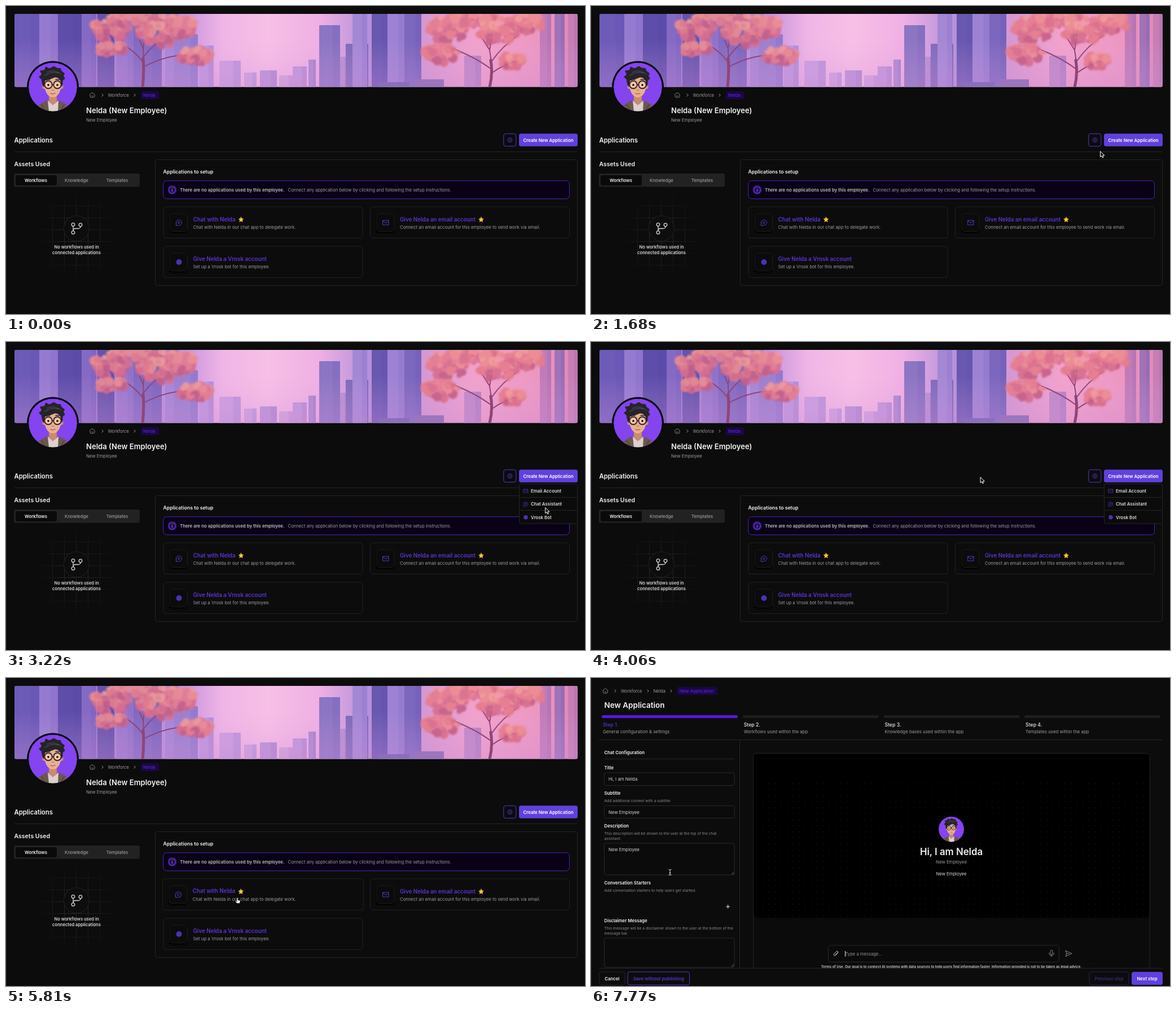
An HTML page for the animation above (8 s loop, 1026x546 px).

```html
<!DOCTYPE html>
<html lang="en">
<head>
<meta charset="utf-8">
<title>New application</title>
<style>
html, body { margin: 0; width: 100%; height: 100%; overflow: hidden; background: #0c0c0c; }
svg { display: block; font-family: Inter, "Noto Sans", sans-serif; cursor: none; }
</style>
</head>
<body>
<svg id="stage" width="1026" height="546" viewBox="0 0 1026 546"></svg>
<script>
const NAME = 'Nelda', BOT = 'Vrosk';
const GREY = '#9b9b9b', LINE = '#252525', VIOLET = '#5a35d0', FILL = '#6040dd';

let seed = 11;
const rand = () => (seed = seed * 16807 % 2147483647) / 2147483647;

const text = (x, y, s, size = 7.8, fill = GREY, weight = 400, anchor = 'start') =>
  `<text x="${x}" y="${y}" font-size="${size}" fill="${fill}" font-weight="${weight}" text-anchor="${anchor}">${s}</text>`;
const label = (x, y, s, size = 7.8) => text(x, y, s, size, '#f2f2f2', 600);
const centred = (x, y, s, size, fill, weight) => text(x, y, s, size, fill, weight, 'middle');
const rect = (x, y, w, h, r = 0, fill = 'none', stroke = 'none') =>
  `<rect x="${x}" y="${y}" width="${w}" height="${h}" rx="${r}" fill="${fill}" stroke="${stroke}"/>`;
const circle = (x, y, r, fill = 'none', stroke = 'none', w = 1) =>
  `<circle cx="${x}" cy="${y}" r="${r}" fill="${fill}" stroke="${stroke}" stroke-width="${w}"/>`;
const path = (d, stroke, w = 1, fill = 'none') =>
  `<path d="${d}" fill="${fill}" stroke="${stroke}" stroke-width="${w}" stroke-linecap="round" stroke-linejoin="round"/>`;
const line = (d, stroke = LINE) => `<path d="${d}" stroke="${stroke}"/>`;
const at = (x, y, s, scale = 1) => `<g transform="translate(${x} ${y}) scale(${scale})">${s}</g>`;

// Icons, each centred on its own origin
const home = path('M-4-1.5 0-4.5 4-1.5V2Q4 4 2 4H-2Q-4 4-4 2ZM-1.5 1.5Q0 2.7 1.5 1.5', GREY, .8);
const chevron = path('M-1-2.2 1.2 0-1 2.2', GREY, 1);
const chat = path('M-5 4.8V0A5 4.8 0 1 1 0 4.8ZM-2-1H2M-2 1.2H1', VIOLET, 1);
const mail = path('M-5-4H5V4H-5ZM-5-3 0 .8 5-3', VIOLET, 1);
const bot = circle(0, 0, 5, '#5030b4');
const star = path('M0-4.2 1.3-1.5 4.2-1.1 2.1 1 2.6 4 0 2.6-2.6 4-2.1 1-4.2-1.1-1.3-1.5Z', '#f4b92e', .8, '#f8c63a');
const gear = path('M-2-3.6H2L4 0 2 3.6H-2L-4 0Z', VIOLET, .9) + circle(0, 0, 1.4, 'none', VIOLET, .9);
const branch = [[-6, -7], [7, -6.5], [-6, 7]].map(([x, y]) => circle(x, y, 2.8, 'none', '#d6d6d6', 1.3)).join('') +
  path('M-6-4V4M7-3.5Q7 0 3 0H-2Q-6 0-6 4', '#d6d6d6', 1.3);

const avatar = `<g clip-path="url(#round)">${circle(0, 0, 43, '#8444f0')}
  ${path('M-31 45Q-29 30-10 24L0 32 10 24Q28 30 31 45Z', 'none', 0, '#6c584f')}
  ${path('M-9 24-7 44H9L10 24 0 32Z', 'none', 0, '#ddd0d0')}
  ${path('M-7 12H7V26L0 32-7 26Z', 'none', 0, '#c98b6c')}
  ${circle(-15, 0, 3.5, '#d99673')}${circle(15, 0, 3.5, '#d99673')}
  ${path('M-15-12Q-16 6-9 14 0 23 9 14 16 6 15-12Q0-26-15-12Z', 'none', 0, '#e8b08e')}
  ${path('M-16 1Q-20-7-20-13L-25-18-20-22-23-29-15-30-13-36-6-33 2-37 7-34 14-33 15-29 21-24 19-19 22-15 18-12 16 1 14-10Q11-17 4-17-6-13-14-11Z', 'none', 0, '#26232a')}
  ${path('M-14-20Q-4-28 9-25M-10-26Q2-32 14-23', '#4a464e', 1.3)}
  ${[-8, 8].map(x => circle(x, -3.5, 3.4, '#fff4ec') + circle(x, -3.5, 2.2, '#4d2b20') + circle(x, -4, 6.8, 'none', '#211a1e', 1.7)).join('')}
  ${path('M-1.3-4H1.3M-14.8-5-17-6M14.8-5 17-6M-12-13-5-13.5M5-13.5 12-13', '#211a1e', 1.5)}
  ${path('M-2 5Q0 7 2 5', '#c47c5e', 1.2)}${path('M-4 11.5Q0 13.5 4 11', '#a94f48', 1.3)}
  ${path('M-20 31-13 43M20 31 13 43', '#4c3c37', 1.2)}</g>`;

const BUILDINGS = [
  [15, 14, 44, '#6d5bb8'], [59, 14, 30, '#957bd0'], [92, 14, 42, '#5e4eaa'], [134, 14, 26, '#856ac4'],
  [162, 14, 30, '#6553ac'], [196, 14, 30, '#9878cd'], [226, 14, 50, '#8069c0'], [282, 14, 24, '#a585d4'],
  [304, 50, 36, '#9a80d0'], [342, 70, 26, '#bd97de'], [378, 97, 38, '#c99fe1'], [422, 118, 22, '#cda3e2'],
  [450, 114, 30, '#bb93d8'], [484, 123, 26, '#d3a3e0'], [508, 107, 25, '#c297db'], [536, 95, 13, '#ae89d0'],
  [555, 34, 37, '#8c75c3'], [592, 90, 12, '#b78fd4'], [602, 67, 40, '#8069ba'], [614, 14, 26, '#a488d6'],
  [648, 14, 28, '#6858b0'], [676, 14, 30, '#9d82d4'], [706, 14, 30, '#7b67bd'],
  [812, 88, 30, '#c088c8'], [946, 14, 20, '#c07cb8'], [972, 14, 18, '#a072b8'], [996, 14, 17, '#c67eb4']];

// Soft leaf masses, lit from above
function foliage(clusters) {
  const tones = ['#f09a98', '#ec8b92', '#e57d8e', '#d96e8c', '#c66188'];
  const leaves = clusters.map(([cx, cy, rx, ry]) => Array.from({ length: 60 }, () => {
    const a = rand() * 6.283, d = Math.sqrt(rand()), lift = Math.sin(a) * d;
    const tone = tones[Math.round(clamp(.5 + lift * .4 + (rand() - .5) * .6) * 4)];
    return circle((cx + Math.cos(a) * d * rx).toFixed(1), (cy + lift * ry).toFixed(1), (3 + rand() * 6).toFixed(1), tone);
  }).join('')).join('');
  return `<g filter="url(#soft)" opacity=".92">${leaves}</g>`;
}

const clamp = v => Math.max(0, Math.min(1, v));
const BARK = '#8f4578';

const banner = `<g clip-path="url(#banner)">${rect(15, 14, 998, 130, 0, 'url(#sky)')}
  ${BUILDINGS.map(([x, y, w, c]) => rect(x, y, w, 130, 1, c) + rect(x + w * .65, y, w * .35, 130, 0, '#4d3c9a18')).join('')}
  ${rect(15, 60, 998, 84, 0, 'url(#haze)')}
  ${rect(660, 135, 55, 9, 1, '#8b6fbd')}${rect(724, 130, 52, 14, 1, '#9b75bd')}
  ${path('M242 144Q245 110 243 75L230 45M243 100Q225 75 198 65M244 90Q262 66 286 52M243 75 249 35M246 107Q280 88 318 87', BARK, 2)}
  ${path('M242 144Q245 118 243 92', BARK, 5)}
  ${foliage([[188, 40, 34, 22], [240, 24, 58, 12], [275, 48, 42, 22], [334, 88, 30, 13], [186, 76, 26, 9], [312, 36, 26, 18]])}
  ${path('M858 144Q863 110 857 78L838 48M860 112Q828 88 782 72M859 100Q880 70 908 52M857 78 864 32M862 118Q878 106 902 98', BARK, 2)}
  ${path('M857 144Q863 120 859 96', BARK, 5)}
  ${foliage([[782, 40, 36, 24], [832, 24, 46, 12], [872, 44, 38, 26], [772, 84, 32, 16], [898, 98, 22, 11], [922, 30, 28, 16]])}</g>`;

const button = (x, y, w, h, s, fill, stroke, colour) =>
  rect(x, y, w, h, 3.5, fill, stroke) + centred(x + w / 2, y + h / 2 + 3, s, 7.8, colour, 600);
const crumb = (x, y, w, s) => rect(x, y, w, 14, 2, '#1b0648') + text(x + 4, y + 9.7, s, 7.9, '#602cd4');

const card = (x, y, icon, title, note, starX) => `<g>${rect(x, y, 353, 55.5, 5, '#0c0c0c', '#222')}
  ${rect(x + 10, y + 13, 33, 34, 5, '#040404')}${rect(x + 11.5, y + 12, 31, 31.5, 5, '#0b0b0b', '#1c1c1c')}${at(x + 27.5, y + 28, icon)}
  ${text(x + 52.5, y + 25.5, title, 9.8, VIOLET, 600)}${text(x + 52.5, y + 38.5, note)}
  ${starX ? at(starX, y + 22.5, star) : ''}</g>`;

const menu = rect(909.5, 251.5, 103, 70.5, 3, '#0b0b0b', LINE) + line('M910 275.5H1012M910 298.5H1012') +
  [[mail, 'Email Account'], [chat, 'Chat Assistant'], [bot, BOT + ' Bot']].map(([icon, s], i) =>
    at(921, 264 + i * 23.4, icon, .75) + text(930, 266.8 + i * 23.4, s, 7.8, '#dcdcdc', 600)).join('');

const employeePage = `${banner}
  ${circle(83, 143.5, 46, '#0b0b0b')}${at(83, 143.5, avatar)}
  ${at(153, 158, home)}${at(171, 158, chevron)}${text(180.5, 160.7, 'Workforce', 7.6)}${at(228, 158, chevron)}
  ${crumb(239, 151, 32, NAME)}
  ${label(142, 190, `${NAME} (New Employee)`, 13.1)}${text(142, 205, 'New Employee')}
  ${label(14.5, 241.5, 'Applications', 11.3)}
  ${rect(881.8, 226.4, 22, 22.2, 3.5, 'none', VIOLET)}${at(893, 237.5, gear)}
  ${button(909, 226.3, 104, 22.4, 'Create New Application', FILL, 'none', '#fff')}
  ${line('M14 258.5H1013')}
  ${label(14.5, 284, 'Assets Used', 10.5)}
  ${rect(14, 297, 223, 23.5, 3, '#222')}${rect(17, 300, 73, 18, 3, '#0a0a0a')}
  ${centred(53, 312, 'Workflows', 7.7, '#f2f2f2', 600)}${centred(125, 312, 'Knowledge', 7.8, GREY, 500)}${centred(197, 312, 'Templates', 7.8, GREY, 500)}
  <g mask="url(#fade)">${line('M82.5 333V480M103.5 333V480M124.5 333V480M145.5 333V480M166.5 333V480M62 354.5H188M62 375.5H188M62 396.5H188M62 417.5H188M62 438.5H188M62 459.5H188', '#272727')}</g>
  ${circle(125, 394.5, 22.5, '#0d0d0d', '#232323')}${at(125, 394.5, branch)}
  ${centred(125, 429.7, 'No workflows used in', 7.6, '#d4d4d4', 600)}${centred(125, 439.7, 'connected applications', 7.6, '#d4d4d4', 600)}
  ${rect(264.5, 272.5, 748, 223, 4, 'none', LINE)}
  ${label(278.5, 297, 'Applications to setup', 8.7)}
  ${rect(278.8, 309.8, 719.6, 32, 6, '#090115', '#4d25b8')}
  ${circle(294.5, 326, 8.5, '#251052')}${circle(294.5, 326, 6, 'none', '#6a3df0', 1.1)}${path('M294.5 325.3V328.8M294.5 323V323.1', '#7b50f5', 1.2)}
  ${text(308, 328.6, 'There are no applications used by this employee.', 7.85, '#bcbcbc', 600)}
  ${text(499.5, 328.6, 'Connect any application below by clicking and following the setup instructions.', 7.78)}
  <g id="chatCard">${card(279, 356, chat, `Chat with ${NAME}`, `Chat with ${NAME} in our chat app to delegate work.`, 416.5)}</g>
  ${card(645.5, 356, mail, `Give ${NAME} an email account`, 'Connect an email account for this employee to send work via email.', 842)}
  ${card(279, 426, bot, `Give ${NAME} a ${BOT} account`, `Set up a ${BOT} bot for this employee.`)}
  <g id="menu">${menu}</g>`;

const steps = ['General configuration &amp; settings', 'Workflows used within the app', 'Knowledge bases used within the app', 'Templates used within the app']
  .map((s, i) => {
    const x = 19 + i * 249.7;
    return rect(x, 66, 241, 5, 2.5, i ? '#1e1e1e' : '#5b16e6') +
      text(x + 2, 85.5, `Step ${i + 1}.`, 8.7, i ? '#ececec' : VIOLET, 500) + text(x + 2, 97.5, s);
  }).join('');

const field = (y, h, s = '') => rect(23.5, y, 230.5, h, 3, '#0b0b0b', '#292929') + text(31, y + 14, s, 7.8, '#d2d2d2');
const hint = (y, s) => text(23.5, y, s, 6.7, '#8c8c8c');

const form = `${label(23.5, 135, 'Chat Configuration')}${line('M23 143.5H254')}
  ${label(23.5, 162.3, 'Title')}${field(168, 22.5, `Hi, I am ${NAME}`)}
  ${label(23.5, 206.6, 'Subtitle')}${hint(219.5, 'Add additional context with a subtitle.')}${field(226.5, 22, 'New Employee')}
  ${label(23.5, 265, 'Description')}${hint(277.5, 'This description will be shown to the user at the top of the chat')}${hint(286.5, 'assistant.')}
  ${field(293, 56, 'New Employee')}${path('M249 348 253 344M251.5 348 253 346.5', '#888', .7)}
  ${label(23.5, 365.5, 'Conversation Starters')}${hint(378.5, 'Add conversation starters to help users get started.')}
  ${path('M239.7 405.3H245.7M242.7 402.3V408.3', '#eee', 1)}
  ${label(23.5, 433, 'Disclaimer Message')}${hint(445.5, 'This message will be a disclaimer shown to the user at the bottom of the')}${hint(454.5, 'message bar.')}
  ${field(461, 52)}${path('M249 511.5 253 507.5M251.5 511.5 253 510', '#888', .7)}`;

const preview = `${rect(288, 133.5, 702, 400, 6, '#0b0b0b', '#292929')}
  ${rect(288.5, 134, 701, 291, 5.5, '#000')}${rect(289, 180, 700, 245, 0, 'url(#dots)')}
  <g opacity=".35">${rect(289, 426, 700, 90, 0, 'url(#dots)')}</g>
  ${at(638.5, 268, avatar, .525)}
  ${centred(638.5, 313.7, `Hi, I am ${NAME}`, 16.8, '#ededed', 600)}
  ${centred(638.5, 329, 'New Employee', 7.8, GREY)}${centred(638.5, 349.6, 'New Employee', 7.7, '#d6d6d6')}
  ${rect(420.5, 474, 409, 29.5, 5, '#0a0a0a', '#292929')}
  ${path('M437.5 487 433.5 491.5Q431.5 493 430.3 491.2 429.7 490 431 488.7L435 484.6Q436.6 483.6 437.6 484.9 438.3 486 437 487.2L433.3 490.3', '#d0d0d0', 1)}
  ${text(450.5, 491.7, 'Type a message...', 7.6, '#929292')}
  ${rect(814, 482.5, 4, 7.5, 2, 'none', '#8a8a8a')}${path('M811.7 487.5Q812 492 816 492 820 492 820.3 487.5M816 492V494', '#8a8a8a', 1)}
  ${path('M841 483.5 852 488.5 841 493.5 842.8 488.5ZM842.8 488.5H847', '#8a8a8a', 1)}
  <path id="caret" d="M450.5 484V494" stroke="#e8e8e8"/>
  ${centred(638.5, 513.7, 'Terms of Use. Our goal is to connect AI systems with data sources to help users find information faster. Information provided is not to be taken as legal advice.', 6.05, '#d0d0d0', 600)}`;

const setupPage = `${at(25.5, 23, home)}${at(43, 23, chevron)}${text(53, 25.7, 'Workforce', 7.6)}${at(101, 23, chevron)}
  ${text(110.5, 25.7, NAME)}${at(142, 23, chevron)}${crumb(152.5, 16, 71.5, 'New Application')}
  ${label(23.5, 52.5, 'New Application', 13.5)}${steps}
  ${line('M14 109.5H1013M263.5 110V514')}
  <g id="content" clip-path="url(#body)">${form}${preview}</g>
  ${line('M14 514.5H1013')}
  ${button(14.5, 521, 45.5, 23, 'Cancel', 'none', LINE, '#f2f2f2')}
  ${button(65, 521, 109.5, 23, 'Save without publishing', 'none', VIOLET, VIOLET)}
  ${button(883, 521, 70, 23, 'Previous step', 'none', '#2c1d5e', '#3b2680')}
  ${button(958, 521, 55, 23, 'Next step', FILL, 'none', '#fff')}`;

const stops = (...list) => list.map(([o, c]) => `<stop offset="${o}" stop-color="${c}"/>`).join('');

stage.innerHTML = `<defs>
  <linearGradient id="sky">${stops([0, '#7d66c4'], [.3, '#c593de'], [.37, '#f0b5e6'], [.45, '#f7c0e6'], [.54, '#efb0e4'], [.63, '#b590da'], [.73, '#d698d2'], [.82, '#f2a2cc'], [.93, '#ec97c2'], [1, '#de86b8'])}</linearGradient>
  <linearGradient id="haze" x2="0" y2="1"><stop stop-color="#e0a2e2" stop-opacity="0"/><stop offset="1" stop-color="#d08fd8" stop-opacity=".35"/></linearGradient>
  <radialGradient id="spot"><stop offset=".2" stop-color="#fff"/><stop offset="1" stop-color="#000"/></radialGradient>
  <filter id="soft"><feGaussianBlur stdDeviation="1.5"/></filter>
  <mask id="fade">${rect(50, 325, 150, 165, 0, 'url(#spot)')}</mask>
  <pattern id="dots" width="10.7" height="10.7" patternUnits="userSpaceOnUse">${circle(5, 5, .65, '#232323')}</pattern>
  <clipPath id="banner">${rect(15, 14, 998, 129.5, 3)}</clipPath>
  <clipPath id="round">${circle(0, 0, 43)}</clipPath>
  <clipPath id="body">${rect(0, 110, 1026, 404)}</clipPath></defs>
  ${rect(0, 0, 1026, 546, 0, '#0c0c0c')}${line('M.5 0V546', '#202020')}
  <g id="employee">${employeePage}</g><g id="setup">${setupPage}</g>
  <g id="pointer">
    <g id="arrow">${path('M0 0V9.6L2.3 7.5 3.9 11 5.6 10.2 4 6.9H7Z', '#fff', 1, '#080808')}</g>
    <g id="hand">${path('M-1 6V1Q0-.6 1 1V4.5L4.5 5.3Q5.4 5.7 5 7.2L4 10.5H-.8L-3.6 7.2Q-3.6 5.4-1 7Z', '#111', .7, '#fff')}</g>
    <g id="beam">${path('M-2-5Q0-5 0-3.8 0-5 2-5M0-4V4M-2 5Q0 5 0 3.8 0 5 2 5M-1 1H1', '#e8e8e8', 1)}</g>
  </g>`;

// Pointer stops: time, x, y
const ROUTE = [[420, 450, 514], [560, 404, 430], [700, 415.5, 374], [910, 520, 330], [1190, 686, 289], [1540, 820, 268],
  [1820, 985, 248], [2030, 988, 234], [2100, 985, 236], [2380, 940, 242], [2870, 945, 259], [3360, 960, 308],
  [3500, 950, 300], [3780, 850, 262], [4060, 690, 240], [4270, 569, 258], [4620, 470, 330], [4970, 410, 389],
  [6230, 410, 389], [6650, 240, 166.5], [6860, 238, 164], [7140, 39, 72], [7420, 80, 200], [7700, 140, 344.5]];

const show = (el, on) => el.style.display = on ? '' : 'none';
const [employee, setup, content, menuBox, chatCard, caret, pointer, arrow, hand, beam] =
  ['employee', 'setup', 'content', 'menu', 'chatCard', 'caret', 'pointer', 'arrow', 'hand', 'beam']
    .map(id => document.getElementById(id));

function pointerAt(t) {
  const i = ROUTE.findIndex(p => p[0] > t);
  if (i < 0) return ROUTE.at(-1).slice(1);
  const a = ROUTE[Math.max(0, i - 1)], b = ROUTE[i], k = clamp((t - a[0]) / (b[0] - a[0]));
  return [a[1] + (b[1] - a[1]) * k, a[2] + (b[2] - a[2]) * k];
}

function draw(now) {
  const t = Math.floor(now % 8000 / 70) * 70;
  const onSetup = t >= 5880;
  show(employee, !onSetup);
  show(setup, onSetup);
  show(content, t >= 6720);
  show(caret, Math.floor((t - 6720) / 525) % 2 === 0);

  const open = clamp((t - 2310) / 140) * (1 - clamp((t - 4130) / 140));
  const scale = .95 + .05 * open;
  menuBox.setAttribute('opacity', open);
  menuBox.setAttribute('transform', `translate(${961 * (1 - scale)} ${249 * (1 - scale) - (1 - open)}) scale(${scale})`);

  const grow = 1 + .0075 * clamp((t - 4760) / 140);
  chatCard.setAttribute('transform', `translate(${455.5 * (1 - grow)} ${383.7 * (1 - grow)}) scale(${grow})`);

  const [x, y] = pointerAt(t);
  const isHand = t >= 4830 && t < 6300, isBeam = t >= 7630;
  show(pointer, t >= 420);
  show(arrow, !isHand && !isBeam);
  show(hand, isHand);
  show(beam, isBeam);
  pointer.setAttribute('transform', `translate(${x} ${y})`);
  requestAnimationFrame(() => draw(performance.now()));
}
draw(performance.now());
</script>
</body>
</html>
```
